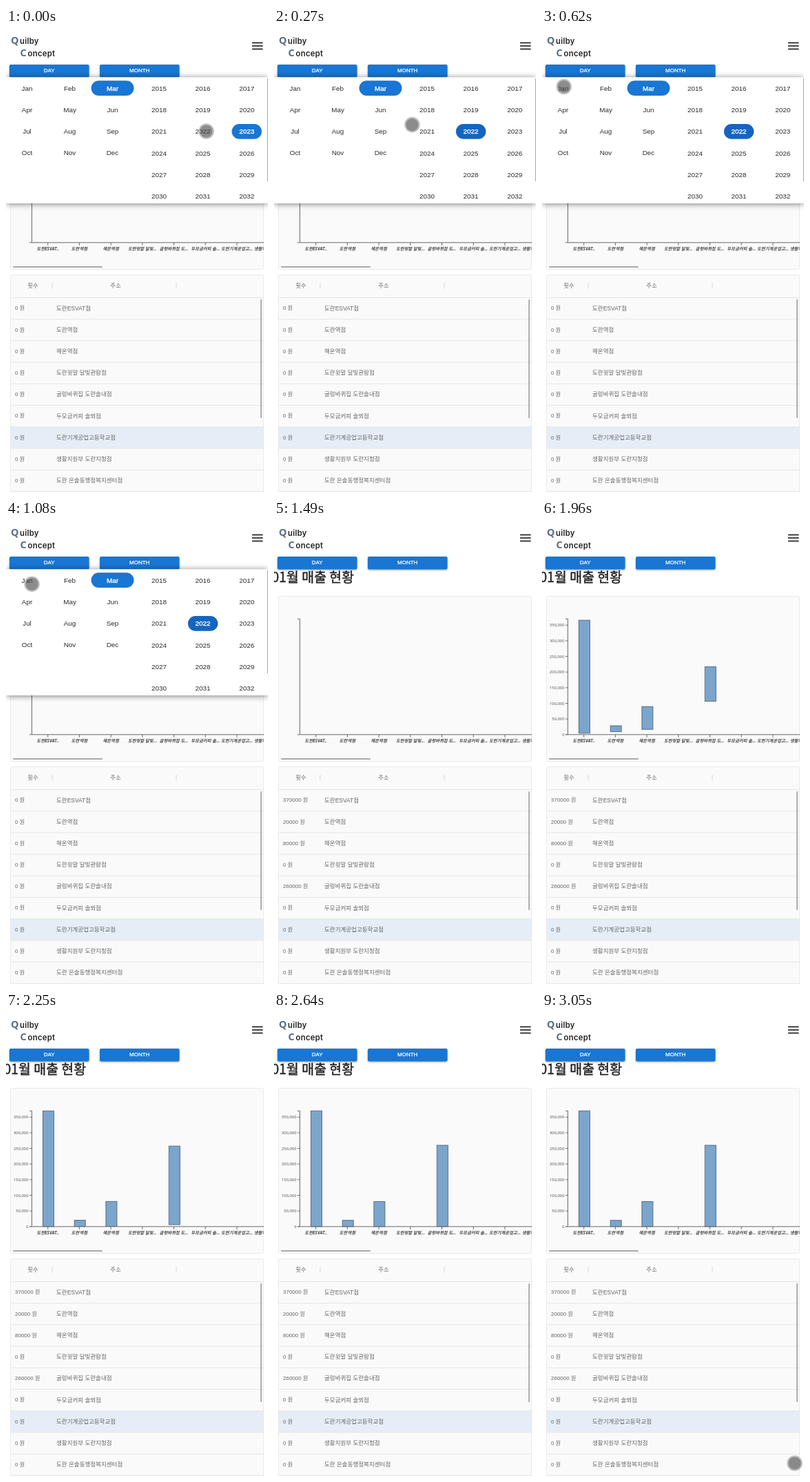
An HTML page with a canvas for the animation above (3.08 s loop, 380 by 672 pixels).

```html
<!DOCTYPE html>
<html lang="ko">
<head>
<meta charset="utf-8">
<title>Monthly sales</title>
<style>
html, body { margin: 0; width: 100%; height: 100%; overflow: hidden; background: #fff; }
canvas { display: block; }
</style>
</head>
<body>
<canvas id="stage" width="380" height="672"></canvas>
<script>
const ctx = document.getElementById('stage').getContext('2d');
const LOOP = 3080;
const PICK = 50, CLOSE = 1110, DATA = 1490;
const SANS = '"Liberation Sans", "Noto Sans CJK KR", "Noto Sans CJK", sans-serif';
const NOTO = '"Noto Sans", "Noto Sans CJK KR", "Noto Sans CJK", sans-serif';
const CJK = '"Noto Sans CJK KR", "Noto Sans CJK", sans-serif';
const BLUE = '#1976d2';

const MONTHS = ['Jan', 'Feb', 'Mar', 'Apr', 'May', 'Jun', 'Jul', 'Aug', 'Sep', 'Oct', 'Nov', 'Dec'];
// start: when the bar begins to grow
const SHOPS = [
  { name: '도란ESVAT점', tag: '도란ESVAT..', won: 370000, start: 1528 },
  { name: '도란역점', tag: '도란역점', won: 20000, start: 1597 },
  { name: '해온역점', tag: '해온역점', won: 80000, start: 1653 },
  { name: '도란윗말 달빛관람점', tag: '도란윗말 달빛...', won: 0 },
  { name: '굴렁바퀴집 도란솔내점', tag: '굴렁바퀴집 도...', won: 260000, start: 1850 },
  { name: '두모금커피 솔뫼점', tag: '두모금커피 솔...', won: 0 },
  { name: '도란기계공업고등학교점', tag: '도란기계공업고...', won: 0 },
  { name: '생활지원부 도란지청점', tag: '생활지원부 도...', won: 0 },
  { name: '도란 은솔동행정복지센터점', won: 0 }
];

// Pointer keys: time, x, y
const TOUCH = [
  [[0, 290.5, 149.5], [50, 290.5, 149.5], [270, 200.8, 140.3], [420, 136, 108], [560, 75, 88],
   [590, 51, 85], [620, 31.8, 85], [750, 31.8, 85], [840, 37.6, 92.7], [1160, 37.6, 92.7]],
  [[3020, 367, 482], [3049, 367, 482], [3050, 366.5, 653.5], [3080, 366.5, 653.5]]
];

function rect(x, y, w, h, fill) {
  ctx.fillStyle = fill;
  ctx.fillRect(x, y, w, h);
}

function round(x, y, w, h, r, fill, stroke) {
  ctx.beginPath();
  ctx.roundRect(x, y, w, h, r);
  if (fill) { ctx.fillStyle = fill; ctx.fill(); }
  if (stroke) { ctx.strokeStyle = stroke; ctx.lineWidth = 1; ctx.stroke(); }
}

function shadowed(color, blur, dy, draw) {
  ctx.save();
  ctx.shadowColor = color;
  ctx.shadowBlur = blur;
  ctx.shadowOffsetY = dy;
  draw();
  ctx.restore();
}

// y is the optical middle of the line; thicken adds a stroke for medium weight
function text(str, x, y, size, { color = '#222', align = 'left', style = '', font = SANS, gap = 0, thicken = 0 } = {}) {
  ctx.font = `${style} ${size}px ${font}`;
  ctx.letterSpacing = gap + 'px';
  ctx.textAlign = align;
  ctx.fillStyle = ctx.strokeStyle = color;
  ctx.fillText(str, x, y + size * 0.36);
  if (thicken) {
    ctx.lineWidth = thicken;
    ctx.strokeText(str, x, y + size * 0.36);
  }
}

function line(points, color) {
  ctx.beginPath();
  points.forEach(([x, y], i) => i ? ctx.lineTo(x, y) : ctx.moveTo(x, y));
  ctx.strokeStyle = color;
  ctx.lineWidth = 1;
  ctx.stroke();
}

// Critically damped spring from 0 to 1
function spring(ms) {
  const x = Math.max(0, ms) * 0.01304;
  return 1 - (1 + x) * Math.exp(-x);
}

function drawHeader() {
  const big = { color: '#5c6d82', style: 'bold', font: '"Noto Sans", sans-serif' };
  const small = { color: '#222', style: '600', font: 'Inter, sans-serif', gap: 0.3 };
  text('Q', 7, 17.5, 14.5, big);
  text('uilby', 20, 19, 11.3, small);
  text('C', 20.5, 35.5, 14.5, big);
  text('oncept', 31.5, 36.5, 11.3, small);
  for (const y of [20.7, 25.2, 29.7]) rect(357, y, 15.5, 1.6, '#1a1a1a');
  [['DAY', 5], ['MONTH', 136]].forEach(([label, x]) => {
    shadowed('rgba(0,0,0,.38)', 3, 1, () => round(x, 53, 115.5, 18.4, 2, BLUE));
    text(label, x + 57.7, 61.3, 8, { color: '#fff', align: 'center', thicken: 0.25 });
  });
}

function drawChart(t) {
  const base = 310.8, unit = 22.65 / 50000, left = 37.5;
  const top = base - 370000 * unit;
  const barX = i => 61.5 + 45.7 * i;
  round(6.5, 110.5, 367, 239, 2, '#fafafb', '#eaeaea');
  round(10, 345.3, 130, 1.4, 0.7, '#8f8f8f');

  ctx.save();
  ctx.beginPath();
  ctx.rect(7, 111, 367, 238);
  ctx.clip();

  ctx.globalAlpha = spring(t - DATA);
  for (let k = 0; k < 8; k++) {
    const y = base - 50000 * k * unit;
    line([[34, y], [left, y]], '#777');
    text((50000 * k).toLocaleString('en-US'), 32.5, y, 5.8, { color: '#555', align: 'right', font: NOTO });
  }
  ctx.globalAlpha = 1;

  const mid = (base + top) / 2;
  SHOPS.forEach((s, i) => {
    if (!s.won || t <= s.start) return;
    const e = spring(t - s.start);
    const h = s.won * unit;
    const y = mid + (base - h - mid) * e;
    ctx.fillStyle = '#7ba5cb';
    ctx.strokeStyle = '#566f88';
    ctx.lineWidth = 1;
    ctx.fillRect(barX(i) - 8, y, 16, h * e);
    ctx.strokeRect(barX(i) - 8, y, 16, h * e);
  });

  line([[34, top], [left, top], [left, base], [34, base]], '#6a6a6a');
  line([[left, base], [374, base]], '#6a6a6a');
  SHOPS.slice(0, 8).forEach((s, i) => {
    const x = barX(i) - 0.8;
    line([[x, base], [x, base + 4]], '#6a6a6a');
    text(s.tag, x, 320, 6.3, { color: '#444', align: 'center', style: 'italic bold', font: NOTO });
  });
  ctx.restore();
}

function drawTable(t) {
  const top = 390.5, pitch = 31.2, ink = '#666';
  round(6.5, 357.5, 367, 330, 2, '#fafafa', '#eaeaea');
  text('횟수', 39, 373, 8.3, { color: ink, align: 'center', font: CJK });
  text('주소', 159, 373, 8.3, { color: ink, align: 'center', font: CJK });
  for (const x of [66.5, 246.5]) rect(x, 369, 1, 8.5, '#d8d8d8');
  SHOPS.forEach((s, i) => {
    const y = top + pitch * i;
    if (i === 6) rect(7, y, 366, pitch, '#e6edf6');
    line([[7, y], [373, y]], '#e6e6e6');
    text(`${t < DATA ? 0 : s.won} 원`, 13, y + 15, 8, { color: ink });
    text(s.name, 73, y + 15, 8.5, { color: ink });
  });
  line([[7, 671.3], [373, 671.3]], '#e6e6e6');
  round(369.2, 393, 1.6, 172, 0.8, '#9a9a9a');
}

function drawCell(label, x, y, fill, w) {
  if (fill) round(x - w / 2, y - 10.8, w, 21.8, 10.9, fill);
  text(label, x, y, 9.9, { color: fill ? '#fff' : '#2a2a2a', align: 'center', thicken: fill ? 0.35 : 0 });
}

function drawPicker(t) {
  shadowed('rgba(0,0,0,.55)', 9, 0.5, () => rect(0, 71.3, 380, 182.7, '#fff'));
  const rowY = i => 87 + 31.25 * Math.floor(i / 3);
  MONTHS.forEach((m, i) => drawCell(m, 30.5 + 62 * (i % 3), rowY(i), m === 'Mar' && BLUE, 62));
  const chosen = t < PICK ? 2023 : 2022;
  for (let i = 0; i < 18; i++) {
    const fill = 2015 + i === chosen && (t < PICK ? BLUE : '#1565c0');
    drawCell(String(2015 + i), 222 + 63.6 * (i % 3), rowY(i) + 0.3, fill, 43.4);
  }
  rect(378.8, 73, 1.2, 149, '#b0b0b0');
}

function drawTouch(t) {
  const keys = TOUCH.find(k => t >= k[0][0] && t < k[k.length - 1][0]);
  if (!keys) return;
  const i = keys.findIndex(k => k[0] > t);
  const [t0, x0, y0] = keys[i - 1], [t1, x1, y1] = keys[i];
  const p = (t - t0) / (t1 - t0);
  ctx.beginPath();
  ctx.arc(x0 + (x1 - x0) * p, y0 + (y1 - y0) * p, 10.2, 0, 7);
  ctx.fillStyle = 'rgba(70,70,70,.62)';
  ctx.fill();
  ctx.strokeStyle = 'rgba(190,190,190,.9)';
  ctx.lineWidth = 2.2;
  ctx.stroke();
}

function draw(t) {
  rect(0, 0, 380, 672, '#fff');
  drawHeader();
  text('01월 매출 현황', 116, 83, 19.4, { align: 'right', font: CJK, thicken: 0.4 });
  drawChart(t);
  drawTable(t);
  if (t < CLOSE) drawPicker(t);
  drawTouch(t);
}

const begin = performance.now();
function tick() {
  draw((performance.now() - begin) % LOOP);
  requestAnimationFrame(tick);
}
tick();
</script>
</body>
</html>
```
